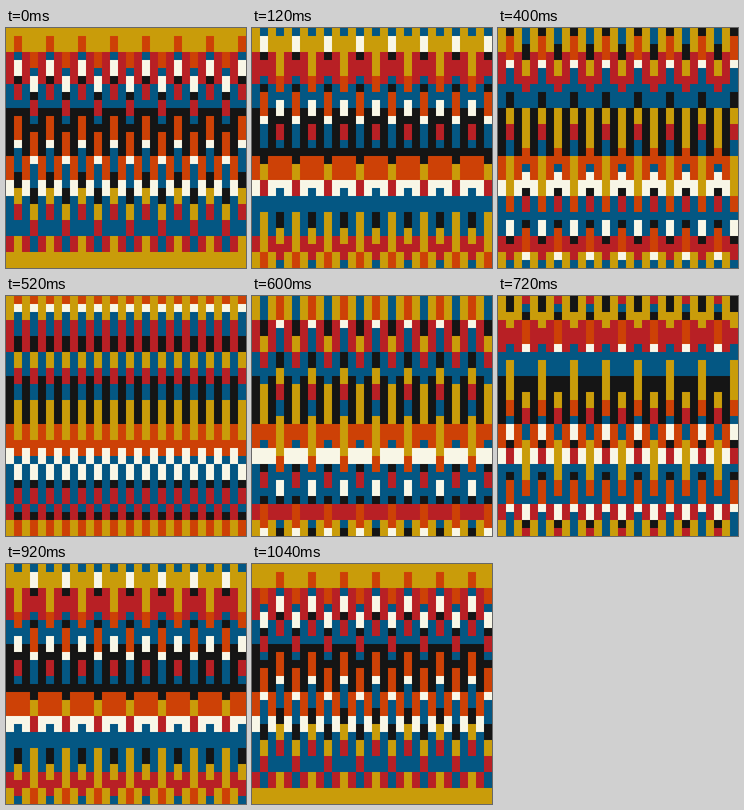
These frames come from a looping animation (300 by 300 pixels, 1080 ms). An HTML page with a canvas:

```html
<!DOCTYPE html>
<html lang="en">
<head>
<meta charset="utf-8">
<title>Woven stripes</title>
<style>
  html, body { margin: 0; width: 100%; height: 100%; overflow: hidden; }
  canvas { display: block; }
</style>
</head>
<body>
<canvas id="stage" width="300" height="300"></canvas>
<script>
const ctx = document.getElementById('stage').getContext('2d');
const CELL = 10, SIZE = 30, STEP_MS = 40, STEPS = 27;

const colors = {
  G: '#c99c0a', R: '#b82025', B: '#045783',
  K: '#151515', O: '#cd4106', W: '#f8f6e6'
};
const warp = 'GGGRRRRBBBKKKKKKOOOWWBBBBBRRGG';   // still columns
const thread = 'GOOBWWKRRBKOOOWBBBKKGGRRBBGGGG'; // sliding columns

// Each sliding thread skips ahead by one extra row on two steps.
const rise = step => -step - (step > 19) - (step > 20);
const fall = step => 2 + step + (step > 5) + (step > 6);

function drawColumn(col, pattern, offset) {
  for (let row = 0; row < SIZE; row++) {
    ctx.fillStyle = colors[pattern[(row - offset + 2 * SIZE) % SIZE]];
    ctx.fillRect(col * CELL, row * CELL, CELL, CELL);
  }
}

function draw(step) {
  for (let col = 0; col < SIZE; col++) {
    if (col % 2 === 0) drawColumn(col, warp, 0);
    else drawColumn(col, thread, col % 4 === 1 ? rise(step) : fall(step));
  }
}

const start = performance.now();
function tick() {
  draw(Math.floor((performance.now() - start) / STEP_MS) % STEPS);
  requestAnimationFrame(tick);
}
tick();
</script>
</body>
</html>
```
